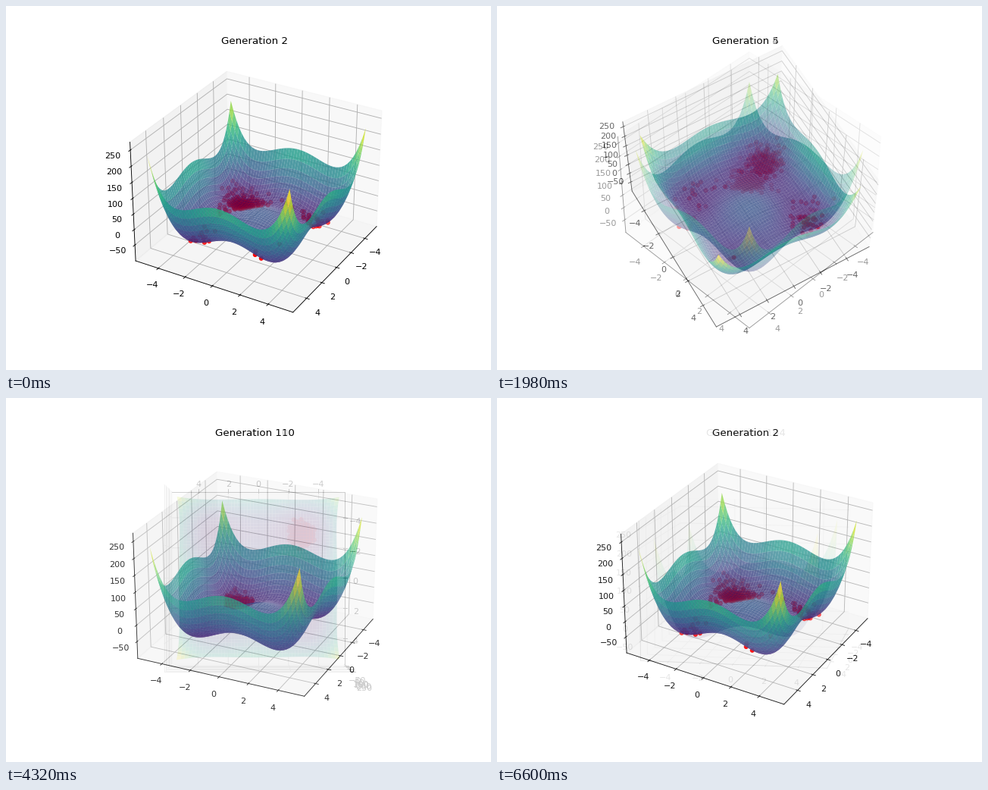
A matplotlib script that plays this animation: 640x480 px, repeating every 6.66 s.

```python
import numpy as np
import matplotlib.pyplot as plt
from matplotlib.animation import FuncAnimation

TICK = 20                    # ms per drawn frame
HOLD, STEP, STEPS = 200, 60, 10
SPAN = HOLD + STEP * (STEPS - 1)

BEST, LOCAL = -2.9, 2.6      # coordinates of the valley floors

# generation: camera angle, used for both elevation and azimuth
VIEWS = {2: 30, 3: 15, 4: 45, 5: 60, 90: 75, 100: 90, 110: 25, 189: 0, 194: 10}


def height(x, y):
    def well(v):
        return (v**4 - 16 * v**2 + 5 * v) / 2
    return well(x) + well(y)


def population(generation):
    """Individuals that leave the side valleys as generations pass."""
    rng = np.random.default_rng(generation)
    youth = max(0, (6 - generation) / 4)

    def cluster(x, y, spread, count):
        return rng.normal((x, y), spread, (int(count), 2))

    def arm():
        count = int(50 * youth)
        along = BEST + rng.exponential(1.0, count)
        across = rng.normal(BEST, 0.35, count)
        return np.column_stack([along, across])

    if not youth:
        return cluster(BEST, BEST, 0.33, 400).T
    parts = [cluster(BEST, BEST, 0.5, 250 - 100 * youth),
             arm(), arm()[:, ::-1],
             cluster(BEST, LOCAL, 0.55, 32),
             cluster(LOCAL, BEST, 0.6, 12),
             cluster(LOCAL, LOCAL, 0.7, 4 * youth)]
    return np.clip(np.vstack(parts), -4.4, 4.4).T


def padded(low, high):
    """Widen a data range by the usual 5 % and then 1/48 on each side."""
    for share in (0.05, 1 / 48):
        pad = (high - low) * share
        low, high = low - pad, high + pad
    return low, high


fig = plt.figure(figsize=(8, 6), dpi=80)


def render(generation, angle):
    """Draw one 3D view and return it as an RGB array."""
    fig.clear()
    ax = fig.add_subplot(projection="3d", computed_zorder=False)
    side = np.linspace(-5, 5, 50)
    x, y = np.meshgrid(side, side)
    z = height(x, y)
    ax.plot_surface(x, y, z, cmap="viridis", alpha=0.8, zorder=2)
    px, py = population(generation)
    ax.scatter(px, py, height(px, py), color="red", zorder=1)

    ax.set_xlim(*padded(-5, 5), view_margin=0)
    ax.set_ylim(*padded(-5, 5), view_margin=0)
    ax.set_zlim(*padded(height(BEST, BEST), height(5, 5)), view_margin=0)
    ax.set_xticks(range(-4, 5, 2))
    ax.set_yticks(range(-4, 5, 2))
    ax.set_zticks(range(-50, 251, 50))
    ax.view_init(elev=angle, azim=angle)
    ax.set_title(f"Generation {generation}", pad=7)
    fig.canvas.draw()
    return np.array(fig.canvas.buffer_rgba())[..., :3].astype(np.float32)


stills = [render(*view) for view in VIEWS.items()]

fig.clear()
stage = fig.add_axes([0, 0, 1, 1])
stage.axis("off")
picture = stage.imshow(stills[0].astype(np.uint8), aspect="auto",
                       interpolation="nearest")


def update(i):
    index, elapsed = divmod(i * TICK, SPAN)
    step = 0 if elapsed < HOLD else (elapsed - HOLD) // STEP + 1
    mix = step / STEPS
    now, after = stills[index], stills[(index + 1) % len(stills)]
    picture.set_data(np.rint(now * (1 - mix) + after * mix).astype(np.uint8))
    return [picture]


anim = FuncAnimation(fig, update, frames=len(VIEWS) * SPAN // TICK,
                     interval=TICK, repeat=True, repeat_delay=0)
plt.show()
```
